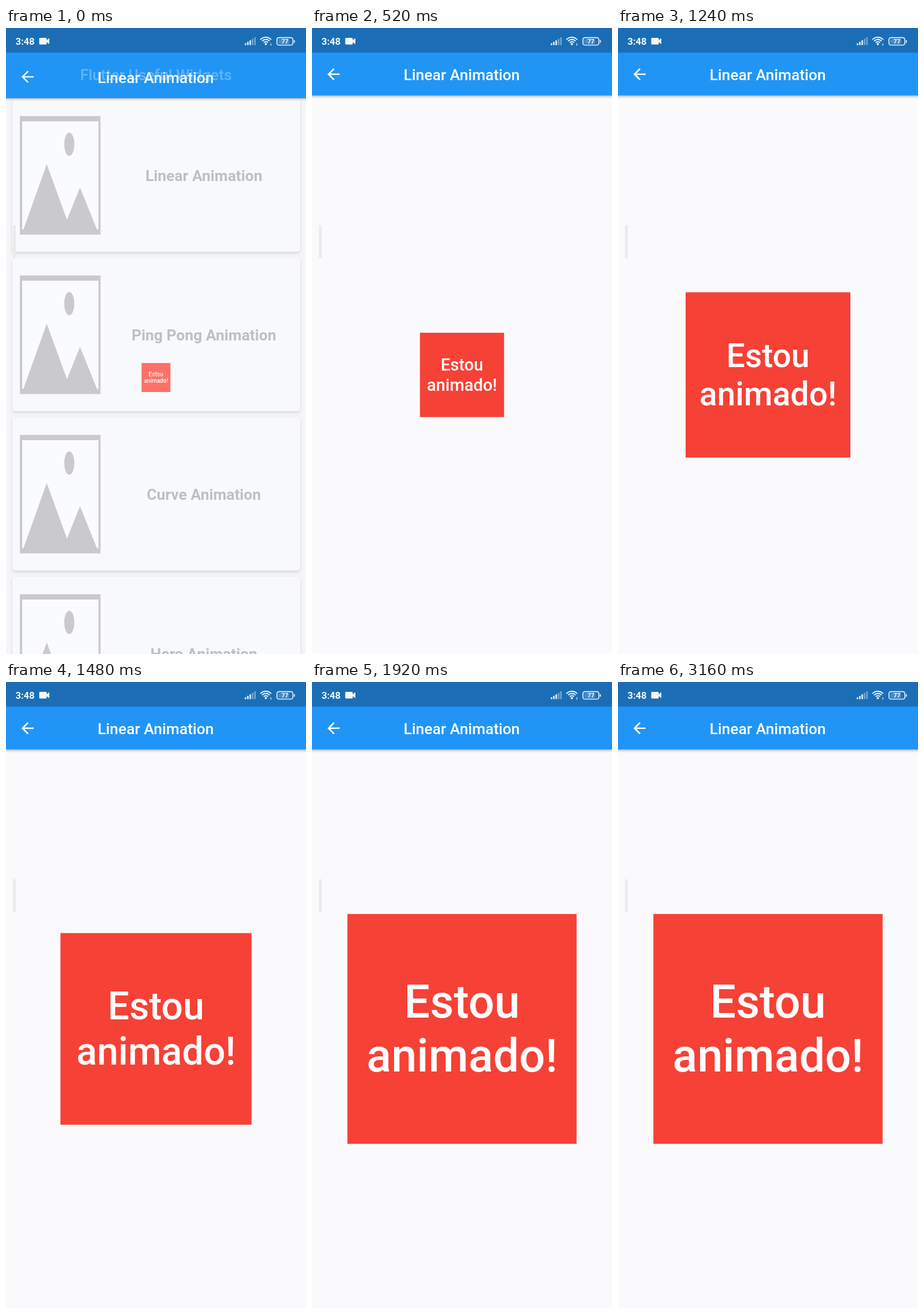
An HTML page with a canvas that plays this animation: 519 by 1080 pixels, repeating every 3200 ms.

```html
<!DOCTYPE html>
<html lang="pt">
<head>
<meta charset="utf-8">
<title>Linear Animation</title>
<style>
  html, body { margin: 0; width: 100%; height: 100%; overflow: hidden; background: #faf9fc; }
  canvas { display: block; width: 519px; height: 1080px; }
</style>
</head>
<body>
<canvas id="stage" width="519" height="1080"></canvas>
<script>
const ctx = document.getElementById('stage').getContext('2d');
const W = 519, H = 1080, CX = 259.5, CY = 598.5;
const LOOP = 3200, SLOT = 40;
const BLUE = '#2195f5';
const ARROW = new Path2D('M20 11H7.83l5.59-5.59L12 4l-8 8 8 8 1.41-1.41L7.83 13H20v-2z');

// [step, side length] of the growing square
const GROWTH = [[0, 50], [11, 145.5], [18, 212], [26, 285], [35, 367], [38.2, 396.5]];

function sideAt(step) {
  for (let i = 1; i < GROWTH.length; i++) {
    const [a, from] = GROWTH[i - 1], [b, to] = GROWTH[i];
    if (step <= b) return from + (to - from) * (step - a) / (b - a);
  }
  return GROWTH[GROWTH.length - 1][1];
}

function rect(x, y, w, h, fill) {
  ctx.fillStyle = fill;
  ctx.fillRect(x, y, w, h);
}

function rounded(x, y, w, h, r, fill) {
  ctx.beginPath();
  ctx.roundRect(x, y, w, h, r);
  ctx.fillStyle = fill;
  ctx.fill();
}

function polygon(points, fill) {
  ctx.beginPath();
  points.forEach(([x, y]) => ctx.lineTo(x, y));
  ctx.closePath();
  ctx.fillStyle = fill;
  ctx.fill();
}

function label(text, x, y, size, weight, fill, align = 'center') {
  ctx.font = `${weight} ${size}px Roboto, sans-serif`;
  ctx.textAlign = align;
  ctx.fillStyle = fill;
  ctx.fillText(text, x, y);
}

function drawStatusBar() {
  rect(0, 0, W, 42.5, '#1b6eb6');
  label('3:48', 16.5, 29, 16.5, 700, '#f4f8fc', 'left');
  rounded(57.5, 17, 13, 11.5, 1.5, '#f4f8fc');
  polygon([[70, 21.5], [75, 17.5], [75, 28], [70, 24]], '#f4f8fc');

  for (let i = 0; i < 5; i++) {
    const h = 3 + i * 2.6;
    rect(413 + i * 4.1, 29.5 - h, 2.6, h, i < 3 ? '#e6eff8' : '#76a8d4');
  }

  ctx.strokeStyle = '#eef5fb';
  ctx.lineWidth = 1.9;
  for (const r of [12.5, 8.7, 4.9]) {
    ctx.beginPath();
    ctx.arc(449.5, 28.5, r, -Math.PI * 0.77, -Math.PI * 0.23);
    ctx.stroke();
  }
  ctx.beginPath();
  ctx.arc(449.5, 27.7, 1.9, 0, Math.PI * 2);
  ctx.fillStyle = '#eef5fb';
  ctx.fill();
  rect(457.5, 26.5, 1.5, 4, '#bcd5eb');

  ctx.beginPath();
  ctx.roundRect(468.7, 16.7, 27.6, 12.8, 3.5);
  ctx.lineWidth = 1.7;
  ctx.strokeStyle = '#e8f1f9';
  ctx.stroke();
  rounded(471, 19, 19, 8.2, 1.5, '#4a8bc5');
  rect(498, 21, 1.7, 4.5, '#e8f1f9');
  label('77', 482.5, 27, 10.5, 700, '#f4f8fc');
}

function drawAppBar(offset) {
  const bottom = 116.5 + offset;
  const shade = ctx.createLinearGradient(0, bottom, 0, bottom + 6);
  shade.addColorStop(0, 'rgba(0,0,0,.27)');
  shade.addColorStop(0.4, 'rgba(0,0,0,.09)');
  shade.addColorStop(1, 'rgba(0,0,0,0)');
  rect(0, bottom, W, 6, shade);
  rect(0, 42, W, bottom - 42, BLUE);
  if (offset) label('Flutter Useful Widgets', CX, 90, 26.4, 500, '#62b4f8');

  const ink = offset ? '#e4f1fe' : '#fff';
  ctx.save();
  ctx.translate(21.4, 63.9 + offset);
  ctx.scale(1.3214, 1.3214);
  ctx.fillStyle = ink;
  ctx.fill(ARROW);
  ctx.restore();
  label('Linear Animation', 259, 90 + offset, 26.4, 500, offset ? '#f4f9ff' : ink);
}

function drawCard(title, top) {
  const gray = '#cac9cd';
  ctx.save();
  ctx.shadowColor = 'rgba(0,0,0,.13)';
  ctx.shadowBlur = 5;
  ctx.shadowOffsetY = 2.5;
  rounded(11, top, 498, 264, 5, '#f8f9fd');
  ctx.restore();

  ctx.save();
  ctx.translate(0, top);
  rect(24, 30, 139.5, 204.5, gray);
  rect(28, 39, 132, 186.5, '#fafbfe');
  polygon([[30, 226], [70.5, 113], [105.5, 209], [128, 153], [157.5, 226]], gray);
  ctx.beginPath();
  ctx.ellipse(109.5, 78.5, 8.7, 20, 0, 0, Math.PI * 2);
  ctx.fillStyle = gray;
  ctx.fill();
  label(title, 342.3, 142.3, 26.4, 700, '#bfbfc3');
  ctx.restore();
}

function drawSquare(side, cy, fill) {
  rect(CX - side / 2, cy - side / 2, side, side, fill);
  const size = side / 5, lineHeight = size * 1.172;
  const baseline = cy - size * 0.244;
  label('Estou', CX, baseline, size, 500, '#fff');
  label('animado!', CX, baseline + lineHeight, size, 500, '#fff');
}

function draw(time) {
  const slot = Math.floor(time / SLOT);
  const step = slot - Math.floor((slot + 2) / 6);
  const entering = slot === 0;
  const offset = entering ? 4.5 : 0;

  rect(0, 0, W, H, entering ? '#f6f6f8' : '#faf9fc');
  if (entering) {
    ['Linear', 'Ping Pong', 'Curve', 'Hero'].forEach((name, i) =>
      drawCard(`${name} Animation`, 122 + i * 275));
  }
  drawSquare(sideAt(step), CY + offset, entering ? '#fd7067' : '#f64136');
  rounded(12, 340, 5, 57.5, 2, '#ebeaed');
  drawAppBar(offset);
  drawStatusBar();
}

const start = performance.now();
function tick() {
  draw((performance.now() - start) % LOOP);
  requestAnimationFrame(tick);
}
tick();
</script>
</body>
</html>
```
